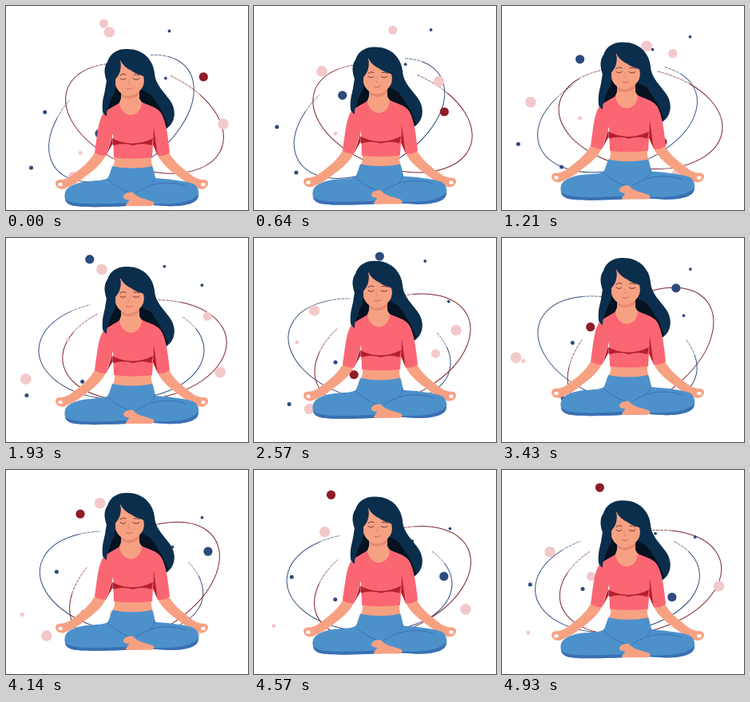
Recreate the animation shown at these times as an HTML page. Size 303 by 256 pixels, loop 5 s.

```html
<!DOCTYPE html>
<html lang="en">
<head>
<meta charset="utf-8">
<title>Meditation</title>
<style>
  html, body { margin: 0; width: 100%; height: 100%; overflow: hidden; background: #fff; }
  svg { display: block; width: 100%; height: 100%; }
  .skin { fill: #f7a183; }
  .shade { fill: #e58a70; }
  .hair { fill: #0a2e4c; }
  .dark { fill: #05121f; }
  .shirt { fill: #fb6673; }
  .fold { fill: #b3202f; }
  .jeans { fill: #4d91cb; }
  .denim { fill: #3a70b3; }
  .line { fill: none; stroke-linecap: round; stroke-linejoin: round; }
</style>
</head>
<body>
<svg viewBox="0 0 303 256">
  <g id="rings" fill="none"></g>
  <g id="dots"></g>
  <g id="woman">
    <!-- back hair -->
    <path class="hair" d="M150 54C170 53 184 66 186 84C187 100 199 108 207 121C214 134 211 147 201 154L150 152L126 139C121 138 120 130 121 121C122 110 127 102 126 94C123 86 122 77 127 70C130 60 139 54 150 54Z"/>
    <path class="dark" d="M136 94L145 106V126L125 138C128 128 131 118 134 106ZM166 106L174 94C177 112 196 124 203 152L165 140Z"/>
    <!-- arms -->
    <path class="skin" d="M111 184L125 187C120 199 106 209 94 218C87 223 81 226 76 228C72 231 65 230 63 226C61 223 62 219 66 218C73 218 78 216 83 212C95 203 104 196 111 184Z"/>
    <path class="skin" d="M204 184L190 187C195 199 209 209 221 218C228 223 234 226 239 228C243 231 250 230 252 226C254 223 253 219 249 218C242 218 237 216 232 212C220 203 211 196 204 184Z"/>
    <!-- waist -->
    <path class="skin" d="M135 186H183C181 193 182 198 185 205H132C136 198 137 193 135 186Z"/>
    <!-- legs -->
    <path class="jeans" d="M133 201Q158 206 183 201C185 206 186 211 187 216C202 217 221 219 234 223C242 226 243 237 239 243C234 249 218 252 201 251L184 250L150 251C128 252 103 253 87 251C75 250 72 241 74 234C76 226 90 221 104 220C116 219 126 219 128 215C130 211 131 206 133 201Z"/>
    <path class="denim" d="M74 242C82 250 112 249 151 247V251C128 252 103 253 87 251C78 250 74 246 74 242ZM241 236C232 248 207 249 181 248L184 250L201 251C218 252 234 249 239 243Q241 240 241 236Z"/>
    <path class="line" stroke="#3a70b3" stroke-width="1" d="M128 218Q136 227 154 234M163 234Q181 222 201 222Q216 222 225 226M186 214Q187 219 181 224"/>
    <path class="skin" d="M147 239C148 235 154 233 159 234C163 240 173 242 183 245C187 247 186 250 182 251H150C150 247 156 245 153 243C150 243 147 242 147 239Z"/>
    <!-- finger rings -->
    <g fill="#fff">
      <ellipse cx="68" cy="224" rx="2.7" ry="2.2"/>
      <ellipse cx="247" cy="224" rx="2.7" ry="2.2"/>
    </g>
    <!-- shirt and neck -->
    <path class="shirt" d="M144 120L169 120C178 125 188 126 194 134C201 145 203 166 205 184Q198 189 190 188L185 158L183 190Q158 193 135 190L134 160L125 188Q117 188 111 184C114 164 115 146 121 136C126 129 137 126 144 120Z"/>
    <path class="skin" d="M144 102H167V116L170 121C169 142 144 142 142 121L144 116Z"/>
    <path class="fold" d="M133 166Q158 179 184 166L182 175Q171 171 159 175Q147 171 134 175ZM133 164L128 180L125 188L134 172ZM185 152L184 174L190 188Z"/>
    <path class="shade" d="M144 108Q154 117 167 107V111Q155 121 144 113Z"/>
    <!-- face -->
    <path class="skin" d="M143 68C138 76 134 89 137 99C139 107 147 113 153 113C161 113 171 106 173 97Q175 90 174 80C162 82 149 77 143 68Z"/>
    <path class="hair" d="M143 68C148 80 162 84 172 88C174 95 172 101 170 105L184 112C187 100 188 86 178 72C168 60 150 57 143 68Z"/>
    <path class="hair" d="M143 67C145 78 143 85 137 92C137 101 138 106 134 112C130 120 126 128 126 138C121 137 120 128 122 118L126 93C123 82 126 73 132 66Z"/>
    <path class="line" stroke="#f7a183" stroke-width=".9" d="M143 69Q148 78 158 82"/>
    <path class="line" stroke="#5b3038" stroke-width=".9" d="M143 91Q147 94 150 91M159 91Q163 94 167 91M143 87Q146 84 150 86M160 86Q164 85 167 87"/>
    <path class="line" stroke="#cf6259" stroke-width="1" d="M151 104Q155 106 158 103"/>
    <path class="line" stroke="#e58a70" stroke-width=".8" d="M155 92L153 98H156"/>
  </g>
</svg>
<script>
const LOOP = 5000, STEPS = 70, TURN = 6700;
const PINK = '#f3c8ca', RED = '#901c28', NAVY = '#2d4a7c';
const $ = id => document.getElementById(id);
const wave = (t, peak = 0) => Math.cos(2 * Math.PI * (t - peak) / TURN);

function add(parent, tag, attrs) {
  const el = document.createElementNS('http://www.w3.org/2000/svg', tag);
  for (const k in attrs) el.setAttribute(k, attrs[k]);
  return parent.appendChild(el);
}

// Orbit on an oval; px and py are the times of largest x and y
const oval = (cx, cy, rx, ry, px, py) => t =>
  [cx + rx * wave(t, px), cy + ry * wave(t, py)];

// Orbit on a closed smooth curve through evenly timed points
const curve = (...pts) => t => {
  const n = pts.length, pos = t / TURN * n, i = Math.floor(pos), u = pos - i;
  const [a, b, c, d] = [-1, 0, 1, 2].map(k => pts[(i + k + n) % n]);
  return [0, 1].map(k => b[k] + u / 2 * (c[k] - a[k]
    + u * (2 * a[k] - 5 * b[k] + 4 * c[k] - d[k]
    + u * (3 * (b[k] - c[k]) + d[k] - a[k]))));
};

const outer = curve([272, 148], [215, 80], [139, 30], [80, 87],
  [18, 144], [54, 210], [140, 210], [230, 208]);
const middle = curve([117, 160], [109, 97], [92, 36], [153, 22],
  [213, 59], [253, 105], [207, 165], [160, 192]);
const right = oval(217, 64, 29, 35, 2150, 3750);
const left = oval(61, 168, 41, 41, 4700, 2750);

const dots = [];
function orbit(path, r, ...riders) {
  for (const [fill, shift] of riders)
    dots.push({ path, shift, el: add($('dots'), 'circle', { r, fill }) });
}
orbit(outer, 6.8, [PINK, 0], [PINK, 1800], [PINK, 4520]);
orbit(middle, 5.6, [NAVY, 0], [PINK, 2150], [RED, 3920]);
orbit(right, 1.9, [NAVY, 0], [NAVY, 4500]);
orbit(left, 2.5, [NAVY, 0], [NAVY, 2170], [PINK, 3990]);

function arc(parent, from, to, width, dash) {
  const at = deg => {
    const a = deg * Math.PI / 180;
    return `${103.5 * Math.cos(a)} ${62 * Math.sin(a)}`;
  };
  add(parent, 'path', {
    d: `M${at(from)}A103.5 62 0 ${to - from > 180 ? 1 : 0} 1 ${at(to)}`,
    'stroke-width': width, 'stroke-dasharray': dash || 'none'
  });
}

// Open ring whose ends thin out into dashes
function ring(stroke, from, to, tail) {
  const g = add($('rings'), 'g', { stroke });
  arc(g, from, from + tail, .7, '4 1');
  arc(g, from + tail, to - tail, 1);
  arc(g, to - tail, to, .7, '4 1');
  return g;
}
const blueRing = ring('#34507f', -42, 248, 16);
const redRing = ring('#7d2630', -84, 240, 25);

function draw(t) {
  $('woman').setAttribute('transform', `translate(0 ${14.5 * (wave(t) - 1)})`);
  blueRing.setAttribute('transform', `translate(144.5 141) rotate(${-8.5 - 28.5 * wave(t, -60)})`);
  redRing.setAttribute('transform', `translate(173.5 141) rotate(${-7 + 29 * wave(t, 200)})`);
  for (const { path, shift, el } of dots) {
    const [x, y] = path((t + shift) % TURN);
    el.setAttribute('cx', x);
    el.setAttribute('cy', y);
  }
}

const start = performance.now();
function tick() {
  const t = (performance.now() - start) % LOOP;
  const step = LOOP / STEPS;
  draw(Math.floor((t + 5) / step) % STEPS * step);
  requestAnimationFrame(tick);
}
tick();
</script>
</body>
</html>
```
